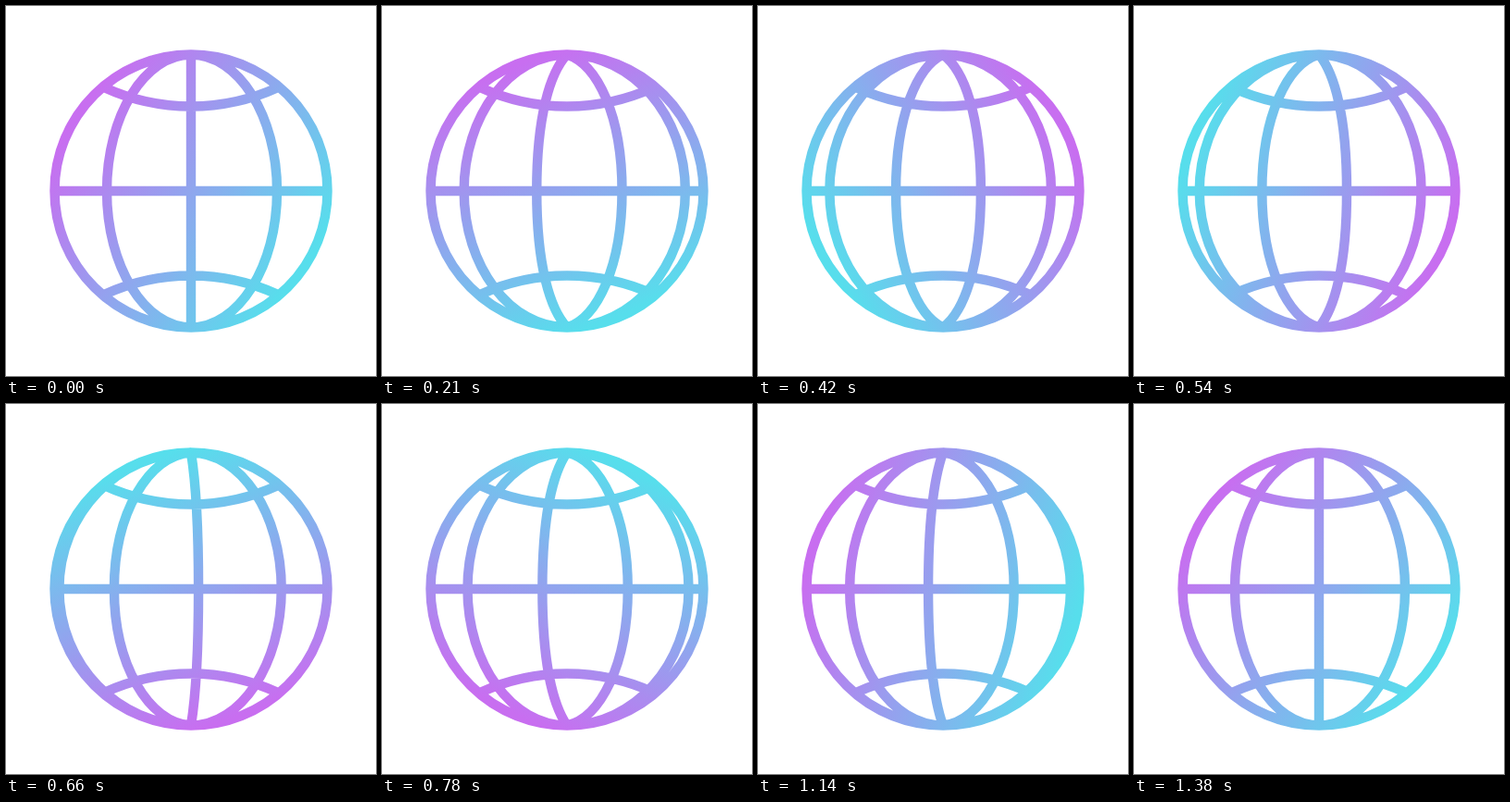
These frames come from a looping animation (400x400 px, 3410 ms). An HTML page with a canvas:

```html
<!DOCTYPE html>
<html lang="en">
<head>
<meta charset="utf-8">
<title>Spinning globe</title>
<style>
html, body { margin: 0; width: 100%; height: 100%; overflow: hidden; background: #fff; }
canvas { display: block; width: 400px; height: 400px; }
</style>
</head>
<body>
<canvas id="stage" width="400" height="400"></canvas>
<script>
const ctx = document.getElementById('stage').getContext('2d');
const LOOP = 3410, SPIN = 1380, STEP = 30;
const C = 200, R = 147.5;

// Resting longitudes at the equator; each line travels to the next one.
const STOPS = [-R, -91, 0, 93, R];

const TIMES = [0, 210, 420, 660, 900, 1140, SPIN];
const TURN = [0, 0.64, 2.44, 4.087, 5.2, 5.825, 6];
const ANGLE = [215, 247, 330, 430, 515, 557, 575];

// Smooth curve through the key values, at rest at both ends.
function ease(values, t) {
  const last = TIMES.length - 1;
  const rate = i => (values[i + 1] - values[i]) / (TIMES[i + 1] - TIMES[i]);
  const slope = i => (i === 0 || i === last) ? 0 : (rate(i - 1) + rate(i)) / 2;
  let i = 0;
  while (i < last - 1 && t >= TIMES[i + 1]) i++;
  const d = TIMES[i + 1] - TIMES[i];
  const u = (t - TIMES[i]) / d, v = 1 - u;
  return values[i] * v * v * (1 + 2 * u) + values[i + 1] * u * u * (3 - 2 * u)
    + d * u * v * (v * slope(i) - u * slope(i + 1));
}

function line(x1, y1, x2, y2) {
  ctx.moveTo(x1, y1);
  ctx.lineTo(x2, y2);
}

function meridian(rx) {
  const k = 0.5523;
  const lift = 30 * Math.max(0, 1 - Math.abs(rx) / 91);
  const x = C + rx, hx = C + rx * k;
  ctx.moveTo(C, C - R);
  ctx.bezierCurveTo(hx, C - R + lift, x, C - R * k, x, C);
  ctx.bezierCurveTo(x, C + R * k, hx, C + R - lift, C, C + R);
}

function parallel(side) {
  const r = 225.8, half = Math.asin(94 / r);
  const mid = side < 0 ? Math.PI / 2 : -Math.PI / 2;
  const cy = C + side * (91.5 + r);
  ctx.moveTo(C + r * Math.cos(mid - half), cy + r * Math.sin(mid - half));
  ctx.arc(C, cy, r, mid - half, mid + half);
}

function tint(degrees) {
  const a = degrees * Math.PI / 180;
  const dx = 146 * Math.cos(a), dy = 146 * Math.sin(a);
  const g = ctx.createLinearGradient(C + dx, C + dy, C - dx, C - dy);
  g.addColorStop(0, '#c86ef0');
  g.addColorStop(1, '#57deec');
  return g;
}

function draw(t) {
  const turn = ease(TURN, t);
  const f = turn - Math.floor(turn + 1e-9);

  ctx.fillStyle = '#fff';
  ctx.fillRect(0, 0, 400, 400);
  ctx.strokeStyle = tint(ease(ANGLE, t));
  ctx.lineWidth = 10.4;

  ctx.beginPath();
  ctx.arc(C, C, R, 0, Math.PI * 2);
  ctx.closePath();
  line(C - R, C, C + R, C);
  parallel(-1);
  parallel(1);
  for (let i = 0; i < 4; i++) {
    meridian(STOPS[i] + (STOPS[i + 1] - STOPS[i]) * f);
  }
  ctx.stroke();
}

const start = performance.now();
function frame() {
  const t = (performance.now() - start) % LOOP;
  draw(Math.min(SPIN, Math.floor(t / STEP) * STEP));
  requestAnimationFrame(frame);
}
frame();
</script>
</body>
</html>
```
